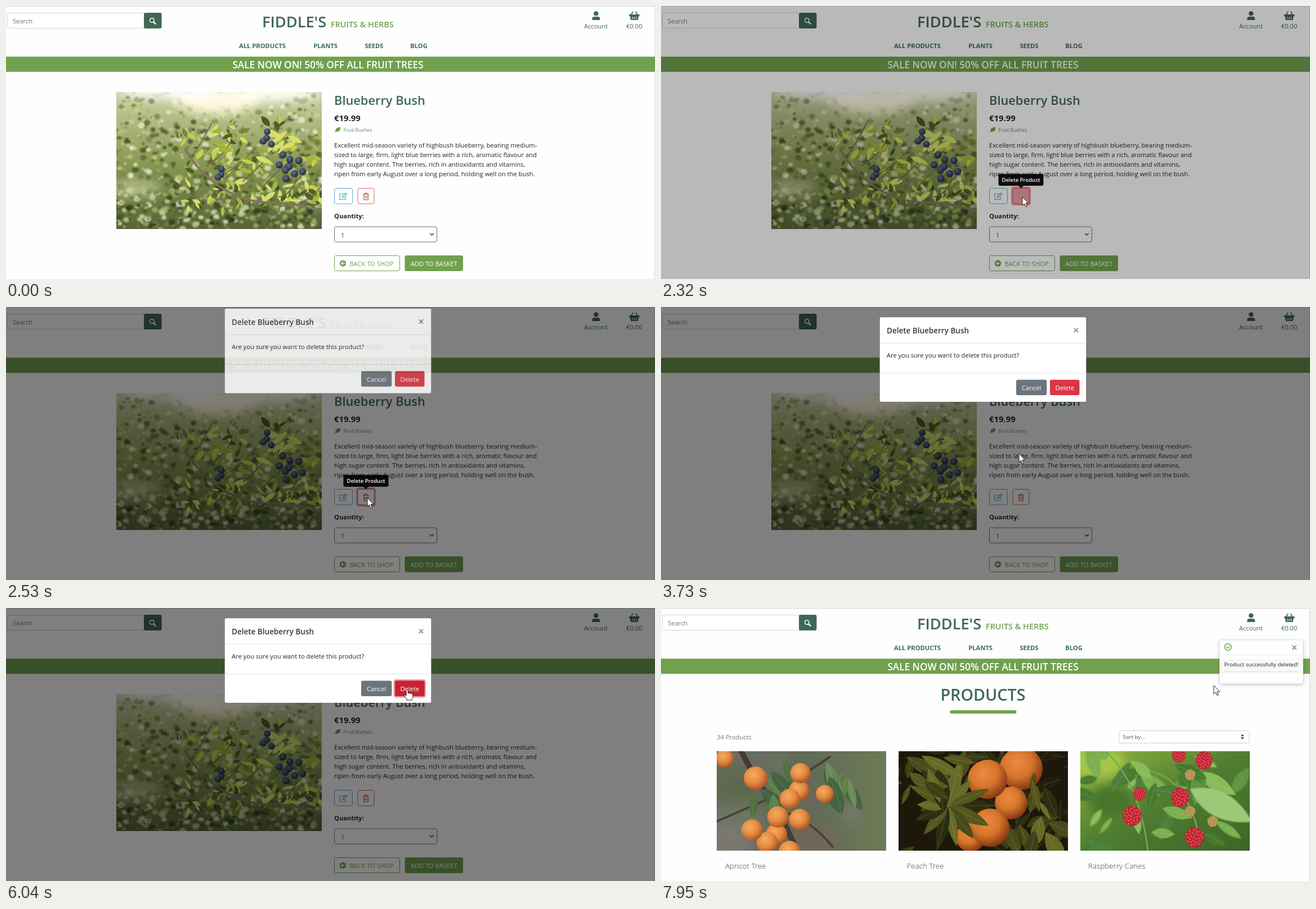
Animation of 1153x486 px, one loop 8000 ms. Source, as an HTML page:

```html
<!DOCTYPE html>
<html lang="en">
<head>
<meta charset="utf-8">
<title>Plant shop: delete a product</title>
<style>
  html, body { margin: 0; width: 100%; height: 100%; overflow: hidden; background: #fff; }
  #stage { display: block; width: 100vw; height: 100vh; font: 11.16px "Open Sans", "Noto Sans", sans-serif; }
  .semi { font-weight: 600; }
  .bold { font-weight: 700; }
  .light { font-weight: 300; }
  .mid { text-anchor: middle; }
  .line { fill: none; stroke-linecap: round; stroke-linejoin: round; }
</style>
</head>
<body>
<svg id="stage" viewBox="0 0 1153 486"></svg>

<script>
const INK = '#212529', PINE = '#3f6857', GREEN = '#71a14f', GRAY = '#6c757d', RED = '#dc3545', BORDER = '#ced4da';
const $ = id => document.getElementById(id);

// Interface parts
const text = (x, y, label, { size = 11.16, color = INK, style = '' } = {}) =>
  `<text x="${x}" y="${y}" font-size="${size}" fill="${color}" class="${style}">${label}</text>`;
const box = (x, y, w, h, fill, stroke = 'none', more = '') =>
  `<rect x="${x}" y="${y}" width="${w}" height="${h}" rx="3" fill="${fill}" stroke="${stroke}" ${more}/>`;
const line = (d, color, width = 1.4) => `<path class="line" d="${d}" stroke="${color}" stroke-width="${width}"/>`;
const shape = (d, fill) => `<path d="${d}" fill="${fill}"/>`;
const disc = (x, y, r, fill, stroke = 'none') =>
  `<circle cx="${x}" cy="${y}" r="${r}" fill="${fill}" stroke="${stroke}" stroke-width="1.5"/>`;
const button = (x, y, w, h, label, fill) =>
  box(x, y, w, h, fill) + text(x + w / 2, y + h / 2 + 4.7, label, { color: '#fff', style: 'mid' });
const ring = (id, x, y, w, h) =>
  box(x - 1.2, y - 1.2, w + 2.4, h + 2.4, 'none', RED, `id="${id}" stroke-width="2.6" stroke-opacity=".5"`);
const closeIcon = (x, y) => line(`M${x} ${y}l6.4 6.4m-6.4 0l6.4-6.4`, '#808080', 1.6);
const trashIcon = color => line('M634.5 335.2h10m-7 0v-2h4v2M635.7 335.5v9.3h7.600v-9.300M638.200 338v4m2.600-4v4', color, 1.2);
const group = (id, content) => `<g id="${id}">${content}</g>`;
const gradient = (id, colors, kind = 'radial', more = 'cx=".4" cy=".35" r=".7"') =>
  `<${kind}Gradient id="${id}" ${more}>${colors.map((c, i) =>
    `<stop offset="${i / (colors.length - 1)}" stop-color="${c}"/>`).join('')}</${kind}Gradient>`;

// Photos: seeded foliage and fruit; an area is [x, y, width, height]
let seed = 7;
const rnd = () => (seed = (seed * 16807) % 2147483647) / 2147483647;
const between = (a, b) => a + rnd() * (b - a);
const pick = list => list[Math.floor(rnd() * list.length)];
const repeat = (n, make) => Array.from({ length: n }, (_, i) => make(i)).join('');
const blob = (x, y, rx, ry, fill, opacity = 1) =>
  `<ellipse cx="${x}" cy="${y}" rx="${rx}" ry="${ry}" fill="${fill}" opacity="${opacity}"/>`;
const blur = (kind, content) => `<g filter="url(#${kind})">${content}</g>`;
const leaf = (x, y, length, width, angle, color) =>
  `<g transform="translate(${x} ${y}) rotate(${angle})">
   ${shape(`M0 0Q${length * .45} ${-width} ${length} 0Q${length * .45} ${width} 0 0`, color)}
   <path stroke="#fff" stroke-opacity=".18" stroke-width=".8" d="M0 0H${length}"/></g>`;
const leaves = (n, [x, y, w, h], length, colors, turn = [0, 360]) => repeat(n, () => {
  const size = between(length * .6, length * 1.3);
  return leaf(x + rnd() * w, y + rnd() * h, size, size * between(.25, .45), between(...turn), pick(colors));
});
const bokeh = (n, [x, y, w, h], size, colors) => repeat(n, () => {
  const r = between(size * .4, size * 1.6);
  return blob(x + rnd() * w, y + rnd() * h, r, r * between(.6, 1), pick(colors), .75);
});
const cluster = (n, x, y, spread, make) => repeat(n, i =>
  make(x + spread * Math.sqrt(i) * Math.cos(i * 2.4), y + spread * Math.sqrt(i) * Math.sin(i * 2.4)));
const fruit = (paint, r) => (x, y) => blob(x, y, r, r, `url(#${paint})`);
const raspberry = (r, flesh, shine) => (x, y) => blob(x, y, r * .92, r, flesh) +
  cluster(28, x, y, r * .17, (px, py) => blob(px, py, r * .17, r * .17, flesh) + blob(px, py - r * .04, r * .1, r * .1, shine, .8));
const ripe = r => raspberry(r, '#bd2433', '#ea5f63');
const photo = ([x, y, w, h], base, content) =>
  `<svg x="${x}" y="${y}" width="${w}" height="${h}" viewBox="${x} ${y} ${w} ${h}">
   <rect x="${x}" y="${y}" width="${w}" height="${h}" fill="${base}"/>${content}</svg>`;

function blueberryPhoto() {
  const area = [196, 153, 365, 244], lower = [196, 320, 365, 77];
  const limes = ['#c3cf45', '#9fb23a', '#d6dd68', '#6c8530', '#46591f', '#aebd4a'];
  const twigs = repeat(7, i => {
    const x = 325 + i * 32, y = 270 + i * 14;
    return line(`M${x} ${y}q${between(10, 30)} ${between(-30, 0)} ${between(30, 65)} ${between(-70, -30)}`, '#6f664c', 1.8);
  });
  return photo(area, 'url(#hedge)',
    blur('soft', bokeh(800, area, 4, ['#e9edd0', '#c9d396', '#75863f', '#424f24', '#a3b158', '#55642e'])) +
    blur('soft', bokeh(170, lower, 4, ['#2a3417', '#46552a', '#333f1c', '#a5b267', '#d5daab'])) +
    blur('haze', blob(375, 168, 75, 24, '#fff8dc') + blob(300, 153, 100, 12, '#fff') + blob(470, 155, 90, 15, '#fffef2') +
      blob(230, 325, 45, 16, '#ced4a0', .7)) +
    leaves(110, [390, 205, 170, 160], 19, limes) + leaves(50, [305, 225, 110, 140], 16, limes) +
    twigs + line('M318 255Q345 300 385 325T470 350T561 366', '#82765f', 4) +
    leaves(14, [320, 220, 210, 60], 30, limes.slice(0, 3), [-80, 30]) +
    cluster(4, 463, 235, 8, fruit('berry', 6)) + cluster(3, 382, 300, 7, fruit('berry', 6)) +
    cluster(9, 503, 286, 9, fruit('berry', 6.5)));
}

function apricotPhoto() {
  const foliage = ['#4d7040', '#5d8148', '#456341', '#6a8a58'];
  return photo([99, 255, 301, 177], 'url(#orchard)',
    blur('haze', bokeh(14, [99, 255, 301, 177], 30, ['#77665a', '#68745f', '#5b694a', '#7d7a70'])) +
    line('M140 250Q165 300 190 335T245 440', '#463a34', 10) +
    line('M99 380L190 340M205 360Q260 370 305 425M210 325L300 265', '#4d3f38', 4) +
    leaves(6, [165, 258, 55, 90], 50, foliage, [30, 110]) + leaves(9, [290, 270, 55, 55], 58, foliage, [40, 130]) +
    fruit('apricot', 16)(113, 268) + fruit('apricot', 21)(168, 303) + fruit('apricot', 16)(291, 331) +
    cluster(3, 245, 325, 22, fruit('apricot', 18)) + cluster(6, 205, 403, 22, fruit('apricot', 19)));
}

function peachPhoto() {
  const olives = ['#3c4016', '#55571d', '#2b2f10', '#676a27', '#474a1a'];
  return photo([422, 255, 301, 177], '#1d180a',
    leaves(70, [400, 240, 320, 190], 50, ['#2c2b10', '#3b3c12', '#241f0c', '#4a4c1c']) +
    [[640, 286, 38], [622, 347, 29], [550, 408, 26], [580, 305, 35], [585, 391, 34]]
      .map(([x, y, r]) => fruit('peach', r)(x, y)).join('') +
    repeat(14, i => leaf(510, 352, between(55, 90), between(16, 24), i * 26, pick(olives))) +
    leaves(9, [650, 290, 50, 110], 60, olives, [20, 110]) + leaves(8, [430, 255, 80, 60], 65, olives, [0, 90]));
}

function raspberryPhoto() {
  const greens = ['#5f9440', '#7caf50', '#47792f', '#4b8037', '#8abb5a'];
  const unripe = raspberry(10, '#a8894a', '#dcc184');
  return photo([745, 255, 301, 177], 'url(#canes)',
    blur('haze', blob(775, 275, 50, 28, '#a5c748') + blob(800, 345, 40, 30, '#4a742c')) +
    blur('soft', leaves(24, [745, 250, 300, 180], 55, greens)) +
    line('M790 255Q850 310 865 432M865 290Q930 300 955 400', '#7fa552', 2.5) +
    leaves(12, [820, 270, 170, 130], 60, greens, [0, 120]) +
    blur('soft', leaf(940, 322, 125, 45, 28, '#9cc975')) +
    ripe(18)(837, 370) + ripe(17)(922, 337) + ripe(18)(948, 408) + ripe(16)(965, 271) +
    ripe(13)(920, 262) + ripe(12)(850, 331) + unripe(940, 297) + unripe(980, 380) + unripe(940, 362));
}

const defs = `<defs>
  <filter id="soft"><feGaussianBlur stdDeviation=".9"/></filter>
  <filter id="haze" x="-30%" y="-30%" width="160%" height="160%"><feGaussianBlur stdDeviation="9"/></filter>
  <filter id="shadow"><feDropShadow dx="0" dy="2" stdDeviation="3" flood-opacity=".2"/></filter>
  ${gradient('apricot', ['#f3ae60', '#e58b43', '#a34d22'])}
  ${gradient('peach', ['#ec8a42', '#d5752a', '#7d2f10'])}
  ${gradient('berry', ['#62718f', '#1c2538'])}
  ${gradient('hedge', ['#ccd2a6', '#8b9955', '#56633a'], 'linear', 'x2="0" y2="1"')}
  ${gradient('orchard', ['#6f706a', '#5f6a58', '#6d7a55'], 'linear', '')}
  ${gradient('canes', ['#94b840', '#4f7d31', '#3c6526'], 'linear', 'x2="1" y2="1"')}
</defs>`;

const navigation = ['ALL PRODUCTS', 'PLANTS', 'SEEDS', 'BLOG'];
const header = line('M0 .5H1152.5V486', '#d5d5d5', 1) +
  box(2.5, 12.5, 247, 27, '#fff', BORDER) + text(12, 31, 'Search', { color: GRAY }) +
  box(245, 12, 31.5, 28, PINE) + disc(259.3, 25.5, 3.8, 'none', '#fff') + line('M262.3 28.6l3.2 3.2', '#fff', 2.4) +
  text(455, 38, "FIDDLE'S", { size: 27.2, color: PINE, style: 'semi' }) +
  text(577, 38, 'FRUITS &amp; HERBS', { size: 14.4, color: GREEN, style: 'semi' }) +
  disc(1048.3, 13.4, 4.2, PINE) + shape('M1041.3 25v-2q0-4 4-4h6q4 0 4 4v2z', PINE) +
  text(1048, 40, 'Account', { color: PINE, style: 'mid' }) +
  shape('M1107 15h18.400v3h-1.500l-1.400 7h-12.600l-1.400-7h-1.500z', PINE) + line('M1113.500 10.600l-3 5m8.500-5l3 5', PINE, 1.8) +
  line('M1113 19.800v3m3.200-3v3m3.200-3v3', '#fff', 1.1) + text(1116, 40, '€0.00', { color: PINE, style: 'mid' }) +
  [455.5, 567.5, 654, 733.5].map((x, i) => text(x, 75, navigation[i], { color: PINE, style: 'bold mid' })).join('') +
  `<rect y="90.200" width="1153" height="27" fill="${GREEN}"/>` +
  text(572, 111, 'SALE NOW ON! 50% OFF ALL FRUIT TREES', { size: 17.2, color: '#fff', style: 'semi mid' });

const description = [
  'Excellent mid-season variety of highbush blueberry, bearing medium-',
  'sized to large, firm, light blue berries with a rich, aromatic flavour and',
  'high sugar content. The berries, rich in antioxidants and vitamins,',
  'ripen from early August over a long period, holding well on the bush.'
];
const details = blueberryPhoto() +
  text(583, 176, 'Blueberry Bush', { size: 21.8, color: PINE, style: 'semi' }) +
  text(583, 204.5, '€19.99', { size: 14.9, style: 'bold' }) +
  shape('M583.5 225l2-3q-1-5.500 8.500-6.500 1 9-7 8.300z', GREEN) + text(599.5, 223.5, 'Fruit Bushes', { size: 8.75, color: '#6b8278' }) +
  description.map((row, i) => text(583, 251.5 + i * 17.25, row)).join('') +
  box(583.5, 324.5, 32, 27.5, '#fff', '#5fb0c4') +
  line('M600.500 334.500h-7.500v10h10v-4M597.500 341l.5-2.400 5.800-5.600 1.900 1.900-5.800 5.700z', '#4aa5bb', 1.2) +
  box(625, 324.5, 29, 27.5, '#fff', '#d2695c') + trashIcon('#b5613f') +
  group('trashHover', box(624.5, 324, 30, 28.5, RED) + trashIcon('#fff')) + ring('trashRing', 624.5, 324, 30, 28.5) +
  text(583, 377.5, 'Quantity:', { style: 'bold' }) +
  box(583.5, 393, 182, 27, '#fff', '#5c7f71') + text(595, 411.5, '1', { color: '#495057' }) + line('M753.500 405l3 3 3-3', '#343a40') +
  box(583.5, 444.5, 116, 27, '#fff', GREEN) + disc(598.5, 458.2, 5.7, GREEN) + line('M601.500 458.200h-5.500m2.300-2.500l-2.500 2.500 2.500 2.500', '#fff') +
  text(610.5, 462.7, 'BACK TO SHOP', { color: GREEN }) + button(708.5, 444, 103.5, 28, 'ADD TO BASKET', GREEN);

const modal = box(388.5, 18, 367, 151, '#fff', '#000', 'stroke-opacity=".2"') +
  text(401, 47, 'Delete Blueberry Bush', { size: 13.5, color: '#343a40', style: 'semi' }) + closeIcon(734.3, 38) +
  line('M389 64.500h366m0 53h-366', '#dee2e6', 1) + text(401, 90, 'Are you sure you want to delete this product?') +
  button(631, 129.5, 54.3, 27.5, 'Cancel', GRAY) + button(691, 129.5, 52.5, 27.5, 'Delete', RED) +
  group('deleteHover', button(691, 129.5, 52.5, 27.5, 'Delete', '#c82333')) + ring('deleteRing', 691, 129.5, 52.5, 27.5);

const tooltip = box(599.5, 299, 80, 21, '#000', 'none', 'fill-opacity=".92"') + shape('M635 320h9l-4.500 4.500z', '#111') +
  text(639.5, 313, 'Delete Product', { size: 9.5, color: '#fff', style: 'semi mid' });

const products = ['Apricot Tree', 'Peach Tree', 'Raspberry Canes'];
const toast = box(992, 57, 149, 78, '#fff', '#000', 'fill-opacity=".94" stroke-opacity=".1" filter="url(#shadow)"') +
  disc(1007.3, 69.5, 6, 'none', GREEN) + line('M1004.500 69.700l2 2 3.700-3.900', GREEN) + closeIcon(1122, 67.2) +
  line('M992.500 83.500h148', '#e9ece6', 1) + line('M1000 113.500h133', '#d5e3c9', 1) +
  text(1000.5, 103.5, 'Product successfully deleted!', { size: 9.8 });
const catalogue = text(572, 165, 'PRODUCTS', { size: 28.7, color: PINE, style: 'semi mid' }) + box(513.5, 182, 118, 6, GREEN) +
  text(99, 234, '34 Products', { color: '#6b7d76' }) +
  box(814, 218.5, 231, 22, '#fff', BORDER) + text(820.5, 233.3, 'Sort by...', { size: 9.8, color: '#495057' }) +
  shape('M1030 228.300l3-3.500 3 3.500zm0 2l3 3.500 3-3.500z', '#343a40') +
  apricotPhoto() + peachPhoto() + raspberryPhoto() +
  products.map((name, i) => text(114 + i * 322.5, 464, name, { size: 13.4, color: '#33443c', style: 'light' })).join('');

const cursor = `<g fill="#fff" stroke="#111" stroke-width=".9" stroke-linejoin="round">
  <path id="arrow" d="M0 0V15.300L3.500 12 5.900 17.600 8.400 16.500 6 11H10.800Z"/>
  <path id="hand" d="M-3 1.500q1.600-3 3.200 0V7q.5-1.500 3 0 .5-1.200 2.900.5.500-1 2.700 1V13q0 2.500-1.500 3.500V19H-2v-2l-4.200-5.500q-.5-3 3.200-.5z"/></g>`;

$('stage').innerHTML = defs + '<rect width="1153" height="486" fill="#fefefe"/>' + header +
  group('product', details + '<rect id="backdrop" width="1153" height="486"/>' + group('modal', modal) + group('tooltip', tooltip)) +
  group('shop', catalogue + group('toast', toast)) + group('cursor', cursor);

// Timeline in milliseconds
const LOOP = 8000, BACKDROP_AT = 2240, MODAL_AT = 2405, SHOWN_AT = 2720, DELETE_HOVER_AT = 4950, SHOP_AT = 6620, LEAVE_AT = 7270;
const clamp = k => Math.min(1, Math.max(0, k));
const ramp = (t, from, length = 150) => clamp((t - from) / length);
const easeInOut = k => k * k * (3 - 2 * k);
const easeOut = k => 1 - (1 - k) ** 1.75;
const moves = [
  { from: 310, to: 1050, x: 659, y: 333 },
  { from: 1050, to: 1120, x: 642, y: 340 },
  { from: 3380, to: 3730, x: 636, y: 261 },
  { from: 4470, to: 5080, x: 714, y: 145 },
  { from: LEAVE_AT, to: 7550, x: 718, y: 161 },
  { from: 7740, to: 7950, x: 982, y: 138 }
];
const fade = (id, value) => $(id).setAttribute('opacity', value);
const show = (id, on) => $(id).setAttribute('display', on ? 'inline' : 'none');
const place = (id, x, y) => $(id).setAttribute('transform', `translate(${x} ${y})`);

function draw(t) {
  show('product', t < SHOP_AT);
  show('shop', t >= SHOP_AT);
  fade('trashHover', ramp(t, 1120) - ramp(t, BACKDROP_AT));
  fade('trashRing', ramp(t, 2110) - ramp(t, SHOWN_AT));
  fade('tooltip', ramp(t, 1190) - ramp(t, SHOWN_AT));
  fade('backdrop', ramp(t, BACKDROP_AT) / 2);
  fade('modal', ramp(t, MODAL_AT));
  place('modal', 0, -37.5 * (1 - easeOut(ramp(t, MODAL_AT, SHOWN_AT - MODAL_AT))));
  fade('deleteHover', ramp(t, DELETE_HOVER_AT));
  fade('deleteRing', ramp(t, 5740));
  fade('toast', ramp(t, 6700));

  let x = 1079, y = 478;
  for (const move of moves) {
    const k = easeInOut(ramp(t, move.from, move.to - move.from));
    x += (move.x - x) * k;
    y += (move.y - y) * k;
  }
  const pointing = (t >= 1120 && t < BACKDROP_AT) || (t >= DELETE_HOVER_AT && t < LEAVE_AT);
  show('cursor', t >= 310);
  show('hand', pointing);
  show('arrow', !pointing);
  place('cursor', x, y);
}

const start = performance.now();
function tick() {
  draw((performance.now() - start) % LOOP);
  requestAnimationFrame(tick);
}
tick();
</script>
</body>
</html>
```
